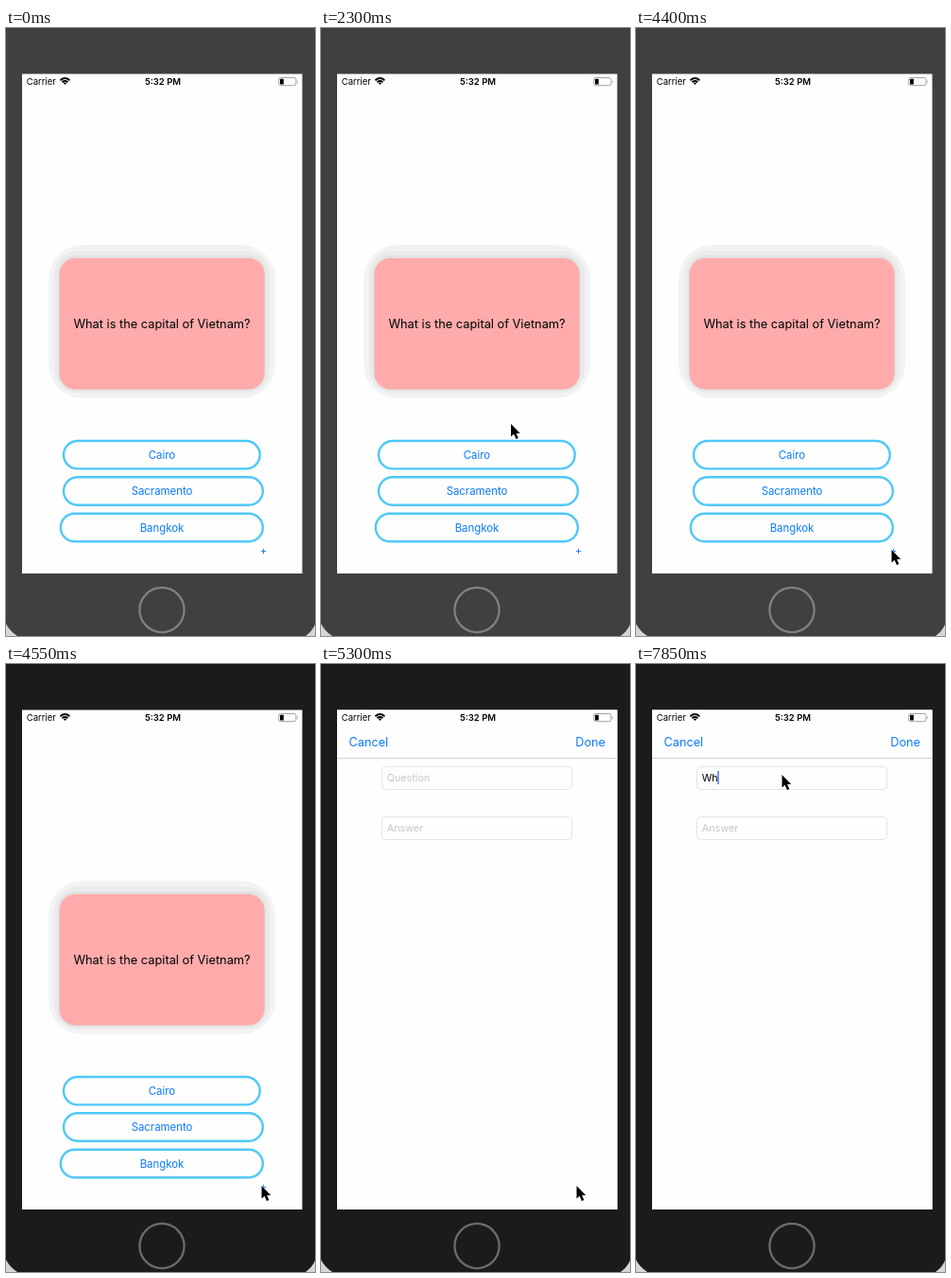
Write an HTML page that moves like this. It is 327 px wide and 642 px high and loops after 8 s.

```html
<!DOCTYPE html>
<html lang="en">
<head>
<meta charset="utf-8">
<title>Flashcards</title>
<style>
  html, body { margin: 0; width: 100%; height: 100%; overflow: hidden; }
  svg { display: block; width: 327px; height: 642px; font-family: Inter, Roboto, sans-serif; }
  .blue { fill: #0a7aff; }
  .mid { text-anchor: middle; }
  .answer { font-size: 11.4px; }
  .pill { fill: #fefefe; stroke: #50c8f8; stroke-width: 2.4; }
  .nav { font-size: 12.7px; }
  .field { fill: #fefefe; stroke: #e3e3e3; }
  .input { font-size: 10.8px; fill: #c7c7cb; }
</style>
</head>
<body>
<svg viewBox="0 0 327 642">
  <defs>
    <clipPath id="screen"><rect x="17" y="48.5" width="296.5" height="527.5"/></clipPath>
  </defs>

  <rect id="bezel" width="327" height="642"/>
  <path d="M0 629Q4 637 12 642H0ZM327 630Q324 637 317 642H327Z" fill="#d6d6d6"/>
  <circle id="home" cx="165" cy="614.5" r="23.6" fill="none" stroke-width="2.3"/>
  <rect x="17" y="48.5" width="296.5" height="527.5" fill="#fefefe"/>

  <g clip-path="url(#screen)">
    <g id="quiz">
      <rect x="45" y="229" width="240" height="162" rx="36" fill="#f3f3f3"/>
      <rect x="50.5" y="235" width="229" height="150.5" rx="26" fill="#ebebeb"/>
      <rect x="55" y="240" width="220" height="143" rx="19" fill="#e1e2e2"/>
      <rect x="56.5" y="243" width="217" height="138.5" rx="17" fill="#ffabab"/>
      <text class="mid" x="165" y="317" font-size="12.8">What is the capital of Vietnam?</text>
      <g id="answers"></g>
      <text class="blue mid answer" x="272.5" y="556">+</text>
    </g>

    <g id="form">
      <rect x="17" y="48" width="297" height="528" fill="#fefefe"/>
      <text class="blue nav" x="29.5" y="86.7">Cancel</text>
      <text class="blue nav" x="301" y="86.7" text-anchor="end">Done</text>
      <path d="M17 99.5H314" stroke="#d2d2d2"/>
      <rect class="field" x="64.5" y="108.5" width="201" height="24" rx="4"/>
      <rect class="field" x="64.5" y="161.5" width="201" height="24" rx="4"/>
      <text class="input" id="question" x="69.7" y="124.2"></text>
      <text class="input" x="69.7" y="177.2">Answer</text>
      <rect id="caret" y="113" width="1.4" height="14" fill="#426bf2"/>
    </g>

    <text x="21.7" y="60" font-size="9.5">Carrier</text>
    <g fill="none" stroke="#000" stroke-width="1.8">
      <path d="M57.4 55.2Q62.4 50.8 67.4 55.2M59.4 57.3Q62.4 54.8 65.4 57.3"/>
      <path d="M60.8 58.2Q62.4 57 64 58.2L62.4 60Z" fill="#000" stroke="none"/>
    </g>
    <text class="mid" x="166" y="60" font-size="9.5" font-weight="600">5:32 PM</text>
    <rect x="288.7" y="52.5" width="18.2" height="8.2" rx="1.8" fill="none" stroke="#9a9a9a" stroke-width=".9"/>
    <rect x="290" y="53.7" width="3.8" height="5.8" rx=".6"/>
    <path d="M308 55.2Q309.6 56.6 308 58Z" fill="#777"/>
  </g>

  <path id="cursor" d="M0 0V13.6L3.1 10.8L5.4 16L7.8 15L5.6 9.9H9.7Z" stroke="#fff" stroke-width="1" paint-order="stroke"/>
</svg>

<script>
const LOOP = 8000, STEP = 150;
const $ = id => document.getElementById(id);

$('answers').innerHTML = [
  ['Cairo', 61, 268.7, 450.7],
  ['Sacramento', 61, 271.8, 489],
  ['Bangkok', 57.8, 271.8, 527.5],
].map(([label, left, right, y]) =>
  `<rect class="pill" x="${left}" y="${y - 14.7}" width="${right - left}" height="29.4" rx="14.7"/>
   <text class="blue mid answer" x="165" y="${y + 4.2}">${label}</text>`).join('');

// Each pointer move: start time, then one tip position per step.
const moves = [
  [500, [297, 577], [281, 535], [262, 499], [247, 472], [238, 455], [235, 448]],
  [2150, [220, 434], [201, 418]],
  [3200, [162.5, 433], [135, 437], [123, 446], [150, 476], [207, 515], [256, 542], [270.5, 551]],
  [5600, [262, 520], [245, 440], [221, 335], [202, 228], [191, 150], [187.5, 122]],
  [6950, [165, 119], [154.5, 117]],
];

function cursorAt(t) {
  const move = moves.filter(m => m[0] <= t).pop();
  if (!move) return null;
  const [start, ...points] = move;
  return points[Math.min(points.length - 1, Math.floor((t - start) / STEP))];
}

function formOffset(t) {
  const step = Math.floor((t - 4850) / STEP);
  return step > 2 ? 0 : 123 * 0.24 ** step;
}

function show(id, visible) {
  $(id).setAttribute('visibility', visible ? 'visible' : 'hidden');
}

function render(t) {
  const active = t >= 4550, formOpen = t >= 4850;
  const focused = t >= 7100, typed = t >= 7850;

  $('bezel').setAttribute('fill', active ? '#1b1b1b' : '#404040');
  $('home').setAttribute('stroke', active ? '#6b6b6b' : '#808080');

  $('form').style.display = formOpen ? '' : 'none';
  if (formOpen) $('form').setAttribute('transform', `translate(0 ${formOffset(t)})`);

  $('question').textContent = typed ? 'Wh' : 'Question';
  $('question').style.fill = typed ? '#000' : '';
  show('caret', focused);
  $('caret').setAttribute('x', typed ? 86.3 : 70);

  const tip = cursorAt(t);
  show('cursor', tip);
  if (tip) $('cursor').setAttribute('transform', `translate(${tip})`);
}

const begin = performance.now();
function tick() {
  render((performance.now() - begin) % LOOP);
  requestAnimationFrame(tick);
}
tick();
</script>
</body>
</html>
```
